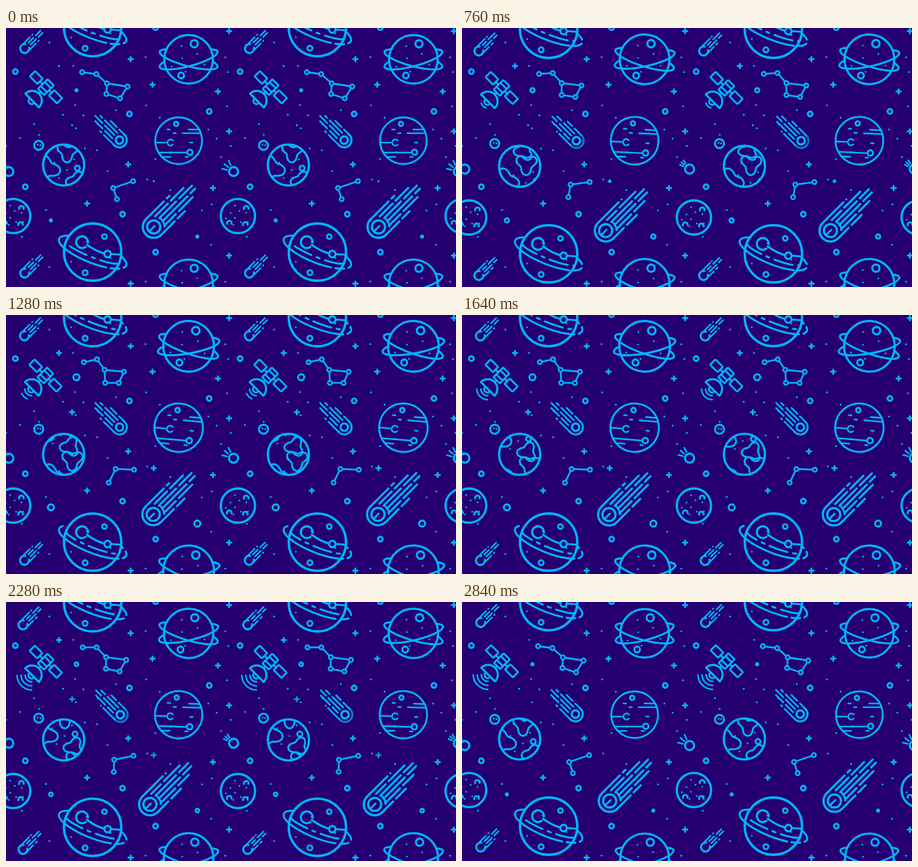
Animation of 722x416 px, one loop 2880 ms. Source, as an HTML page with a canvas:

```html
<!DOCTYPE html>
<html lang="en">
<head>
<meta charset="utf-8">
<title>Space pattern</title>
<style>
html, body { margin: 0; width: 100%; height: 100%; overflow: hidden; background: #260070; }
canvas { display: block; width: 722px; height: 416px; }
</style>
</head>
<body>
<canvas id="stage" width="722" height="416"></canvas>
<script>
const ctx = document.getElementById('stage').getContext('2d');
const LOOP = 2880, STEP = 40, TILE = 360.6;
const TAU = Math.PI * 2, GOLDEN = 2.4;
const BACK = '#260070', LINE = '#00b4ff', WIDTH = 3;

const clamp = v => Math.min(1, Math.max(0, v));
const ramp = (t, from, to) => clamp((t - from) / (to - from));
const mix = (a, b, k) => a + (b - a) * k;

function seeded(seed) {
  return () => (seed = (seed * 16807) % 2147483647) / 2147483647;
}

function at(x, y, angle, scale, draw) {
  ctx.save();
  ctx.translate(x, y);
  ctx.rotate(angle);
  ctx.scale(scale, scale);
  draw();
  ctx.restore();
}

function arc(x, y, r, from = 0, to = TAU, width = WIDTH) {
  ctx.lineWidth = width;
  ctx.beginPath();
  ctx.arc(x, y, r, from, to);
  ctx.stroke();
}

function disc(x, y, r = 1.5, color = LINE) {
  ctx.fillStyle = color;
  ctx.beginPath();
  ctx.arc(x, y, r, 0, TAU);
  ctx.fill();
}

function line(x1, y1, x2, y2, width = WIDTH) {
  ctx.lineWidth = width;
  ctx.beginPath();
  ctx.moveTo(x1, y1);
  ctx.lineTo(x2, y2);
  ctx.stroke();
}

function box(x, y, w, h) {
  ctx.lineWidth = WIDTH;
  ctx.beginPath();
  ctx.roundRect(x - w / 2, y - h / 2, w, h, 1.5);
  ctx.fillStyle = BACK;
  ctx.fill();
  ctx.stroke();
}

function plus(x, y, size = 1) {
  const arm = 3.6 * size;
  line(x - arm, y, x + arm, y);
  line(x, y - arm, x, y + arm);
}

// Small dots spread over a disc along a golden-angle spiral.
function speckle(count, radius, turn) {
  for (let i = 0; i < count; i++) {
    const r = radius * Math.sqrt((i + 0.7) / count), a = turn + i * GOLDEN;
    disc(r * Math.cos(a), r * Math.sin(a), 1.4);
  }
}

// Parallel streaks along +x behind a round head, longest in the middle, each with a drifting gap.
function tail(lanes, radius, length, beat, width) {
  for (let i = 0; i < lanes; i++) {
    const u = mix(-1, 1, i / (lanes - 1)), y = u * radius;
    const start = Math.sqrt(radius * radius - y * y) * 0.9 + 1;
    const reach = length * (1 - 0.42 * u * u);
    const gap = mix(start, reach, 0.62 + 0.2 * Math.cos(i * 2.2) + 0.12 * beat * Math.cos(i * Math.PI));
    line(start, y, gap - width, y, width);
    line(gap + width, y, reach, y, width);
  }
}

function smallComet({ beat }) {
  ctx.rotate(-Math.PI / 4);
  arc(0, 0, 7.2, 0.6, TAU - 0.6, 3.3);
  at(4, 0, 0, 1, () => tail(4, 7, 36, beat, 2.5));
}

function mediumComet({ beat }) {
  ctx.rotate(-Math.PI * 0.75);
  arc(0, 0, 6, 0, TAU, 3.4);
  ctx.globalAlpha = 1 - 0.35 * beat;
  arc(0, 0, 11.8, 1.4, TAU - 1.4, 3.2);
  ctx.globalAlpha = 1;
  tail(5, 11.8, 55, beat, 2.7);
}

function largeComet({ beat }) {
  ctx.rotate(-Math.PI / 4);
  arc(0, 0, 17.5, Math.PI / 2, Math.PI * 1.5, 3.6);
  arc(0, 0, 17.5, -0.2, 0.75);
  arc(0, 0, 10.5, 0, TAU, 3.5);
  line(-9, 0, 2, 0);
  tail(6, 17.5, 92, beat, 3.3);
}

function probe({ beat }) {
  arc(0, 0, 7.3, 0, TAU, 3.4);
  for (let i = -1; i <= 1; i++) {
    const a = -2.45 + i * 0.45 * (1 - 0.4 * beat);
    at(0, 0, a, 1, () => line(11, 0, 19 - 2 * beat, 0, 2.6));
  }
}

function moon() {
  arc(0, 0, 27.5, 0, TAU, 3.6);
  for (let i = 0; i < 3; i++) {
    const a = -0.75 + i * 1.6;
    arc(18 * Math.cos(a), 18 * Math.sin(a), 3.8, Math.PI * 0.9, TAU + 0.2);
  }
  speckle(9, 20, 2.6);
}

// Closed shoreline with three lobes.
function island(x, y, radius, turn) {
  ctx.lineWidth = WIDTH;
  ctx.beginPath();
  for (let a = 0; a <= TAU; a += 0.15) {
    const r = radius * (1 + 0.28 * Math.sin(3 * a + turn));
    ctx.lineTo(x + r * Math.cos(a), y + r * Math.sin(a));
  }
  ctx.closePath();
  ctx.stroke();
}

function earth({ t }) {
  arc(0, 0, 33, 0, TAU, 3.6);
  ctx.beginPath();
  ctx.arc(0, 0, 32, 0, TAU);
  ctx.clip();
  for (let k = -2; k <= 1; k++) {
    const shift = k + t / LOOP;
    at(18 * shift, 69 * shift, 0, 1, () => {
      island(-27, 6, 17, 1);
      island(6, -22, 14, 3);
      island(20, 26, 13, 5);
      arc(22, 5, 4);
      speckle(5, 26, 1);
    });
  }
}

function stripedPlanet() {
  const radius = 37.5;
  arc(0, 0, radius);
  arc(-4, -27, 3.5);
  arc(-13, 3, 5, 0.7, TAU - 0.7, 2.6);
  arc(18, 18.5, 4.3);
  // Signed stripe lengths: positive from the left rim, negative from the right.
  [[-18, -17], [-12, -29], [3, 17], [19, 44], [26, 14]].forEach(([y, length]) => {
    const side = Math.sign(length), rim = -side * Math.sqrt(radius * radius - y * y);
    const end = rim + length;
    line(rim, y, end, y, 2.6);
    line(-end - side * 2, y, -end + side * 2, y, 2.6);
  });
}

// Front half of a ring plus the part of the back half that shows beside the planet.
function orbit(rx, ry, tilt, shown, dash = [], drift = 0) {
  ctx.lineWidth = 3.2;
  ctx.setLineDash(dash);
  ctx.lineDashOffset = -drift;
  ctx.beginPath();
  ctx.ellipse(0, 0, rx, ry, tilt, -shown, Math.PI + shown);
  ctx.stroke();
  ctx.setLineDash([]);
}

function orbitedPlanet() {
  arc(0, 0, 39, 0, TAU, 3.4);
  orbit(48, 11, 0.26, 0.65);
  orbit(48, 11, -0.26, 0.65);
  arc(9, -25, 5.8, 0, TAU, 3.2);
  arc(-12, 26, 4.6, 0, TAU, 3.2);
  speckle(7, 33, 3.3);
}

function saturn({ sway }) {
  arc(0, 0, 46, 0, TAU, 3.8);
  arc(-17, -16, 9.5, 0.9, TAU + 0.05, 3.4);
  ctx.beginPath();
  ctx.moveTo(-9, -12);
  ctx.quadraticCurveTo(4, -2, 18, 2);
  ctx.stroke();
  arc(24, 3, 5.2, 0, TAU, 3.4);
  line(30, 3, 43, 4);
  arc(19, -25, 3.8);
  arc(-12, 33, 4);
  speckle(3, 40, 4.2);
  orbit(58, 17, 0.38, 0.7, [24, 7, 14, 7, 120], -20 * sway);
  orbit(46, 8, 0.38, -0.2, [30, 9, 5, 9], 20 * sway);
}

function minorPlanet() {
  arc(0, 0, 7.3, 0, TAU, 3.2);
  speckle(2, 3, 3.8);
}

function satellite({ t }) {
  at(0, 0, Math.PI / 4, 1, () => {
    line(-16, 0, 16, 0);
    line(0, 8, 0, 18);
    box(-22, 0, 17, 12);
    box(22, 0, 18, 12);
    box(0, 0, 14, 22);
    line(-6, -4.5, 6, -4.5);
    line(-6, 4.5, 6, 4.5);
  });
  at(-22, 21.5, Math.PI / 4, 1, () => {
    ctx.lineWidth = 3.3;
    ctx.beginPath();
    ctx.arc(0, 0, 15.5, Math.PI, TAU);
    ctx.closePath();
    ctx.fillStyle = BACK;
    ctx.fill();
    ctx.stroke();
    arc(0, 1, 5, 0, Math.PI);
    for (let i = 0; i < 3; i++) {
      const grow = ramp(t, 350 + i * 650, 950 + i * 650);
      const half = 0.76 * grow, middle = Math.PI / 2;
      if (grow) arc(0, 0, 11 + i * 6.5, middle - half, middle + half, 2.5);
    }
  });
}

// Each node moves from its first point to its second.
function constellation(nodes, edges, sway) {
  const spots = nodes.map(([x1, y1, x2, y2]) => [mix(x1, x2, sway), mix(y1, y2, sway)]);
  edges.forEach(([a, b]) => line(...spots[a], ...spots[b], 2.8));
  spots.forEach(([x, y]) => {
    disc(x, y, 4, BACK);
    arc(x, y, 3.3, 0, TAU, 2.7);
  });
}

function dipper({ sway }) {
  constellation([[-38, -18, -35, -13], [-15, -15, -14, -18], [2, 0, -2, -1],
    [35, 5, 29, 2], [23, 24, 21, 20], [1, 17, -1, 20]],
    [[0, 1], [1, 2], [2, 3], [3, 4], [4, 5], [5, 2]], sway);
}

function triad({ sway }) {
  constellation([[-13, -3, -9, -13], [19, -14, 20.5, -11.5], [-7, 15, -20.5, 9]], [[0, 1], [0, 2]], sway);
}

// room: clear radius; sway: shift once per loop; beat: shift twice per loop.
const BODIES = [
  { draw: saturn, x: 139, y: 360, room: 60, sway: [0, 5] },
  { draw: orbitedPlanet, x: 293, y: 50.3, room: 54, turn: 0.085, swell: 0.045 },
  { draw: stripedPlanet, x: 277, y: 181, room: 46, turn: 0.09, swell: 0.04 },
  { draw: earth, x: 92.5, y: 220, room: 42, sway: [0, 4] },
  { draw: moon, x: 11.5, y: 302, room: 36, sway: [0, 4.3] },
  { draw: minorPlanet, x: 52.5, y: 188.5, room: 16, sway: [0, -5.3] },
  { draw: satellite, x: 64, y: 95, room: 52, sway: [-0.8, 2.2] },
  { draw: smallComet, x: 30, y: 33, room: 36, beat: [-3, 4] },
  { draw: mediumComet, x: 182, y: 180, room: 32, beat: [1.5, 1] },
  { draw: largeComet, x: 237, y: 319.5, room: 54, beat: [-6.5, 6] },
  { draw: probe, x: 4.5, y: 230.5, room: 24, beat: [0, -4] },
  { draw: dipper, x: 160, y: 89, room: 46 },
  { draw: triad, x: 185, y: 260, room: 32 }
];
const PLUSES = [[200, 50], [235, 91], [340, 102], [358, 5], [358, 166], [196, 219], [332, 257], [130, 282]];
const RINGS = [[15, 70], [198, 138], [326, 134], [31, 255], [187, 299], [240, 360]];
const PULSES = [[113, 100], [72, 309], [307, 335]];

const wrapped = d => Math.abs(d - TILE * Math.round(d / TILE));
const apart = (x1, y1, x2, y2) => Math.hypot(wrapped(x1 - x2), wrapped(y1 - y2));

// Random stars that keep clear of the bodies, the marks and each other.
function scatterStars() {
  const random = seeded(42), stars = [], marks = [...PLUSES, ...RINGS, ...PULSES];
  for (let tries = 0; tries < 900 && stars.length < 32; tries++) {
    const x = random() * TILE, y = random() * TILE;
    const free = BODIES.every(b => apart(x, y, b.x, b.y) > b.room)
      && [...marks, ...stars].every(([mx, my]) => apart(x, y, mx, my) > 18);
    if (free) stars.push([x, y]);
  }
  return stars;
}
const STARS = scatterStars();

function sky({ t, sway }) {
  STARS.forEach(([x, y]) => disc(x, y));
  PLUSES.forEach(([x, y]) => plus(x, y));
  RINGS.forEach(([x, y]) => arc(x, y, 3.8, 0, TAU, 3.2));
  PULSES.forEach(([x, y]) => arc(x, y, mix(1.6, 5, sway), 0, TAU, 3.2));

  ctx.globalAlpha = 1 - ramp(t, 2400, 2860);
  plus(85, 61, ramp(t, 0, 420));
  ctx.globalAlpha = 1 - ramp(t, 2200, 2500);
  plus(106, 156, ramp(t, 850, 1250));
  plus(237, 246, ramp(t, 500, 1050));
  ctx.globalAlpha = 1;
}

function place({ draw, x, y, sway = [0, 0], beat = [0, 0], turn = 0, swell = 0 }, now) {
  at(x + sway[0] * now.sway + beat[0] * now.beat, y + sway[1] * now.sway + beat[1] * now.beat,
    turn * now.sway, 1 + swell * now.sway, () => draw(now));
}

function frame() {
  const t = Math.floor((performance.now() % LOOP) / STEP) * STEP;
  const phase = TAU * t / LOOP;
  const now = { t, sway: (1 - Math.cos(phase)) / 2, beat: (1 - Math.cos(2 * phase)) / 2 };

  ctx.fillStyle = BACK;
  ctx.fillRect(0, 0, 722, 416);
  ctx.strokeStyle = LINE;
  ctx.lineCap = ctx.lineJoin = 'round';
  for (let row = -1; row <= 1; row++) {
    for (let column = 0; column <= 2; column++) {
      at(column * TILE, row * TILE, 0, 1, () => {
        sky(now);
        BODIES.forEach(body => place(body, now));
      });
    }
  }
  requestAnimationFrame(frame);
}
frame();
</script>
</body>
</html>
```
